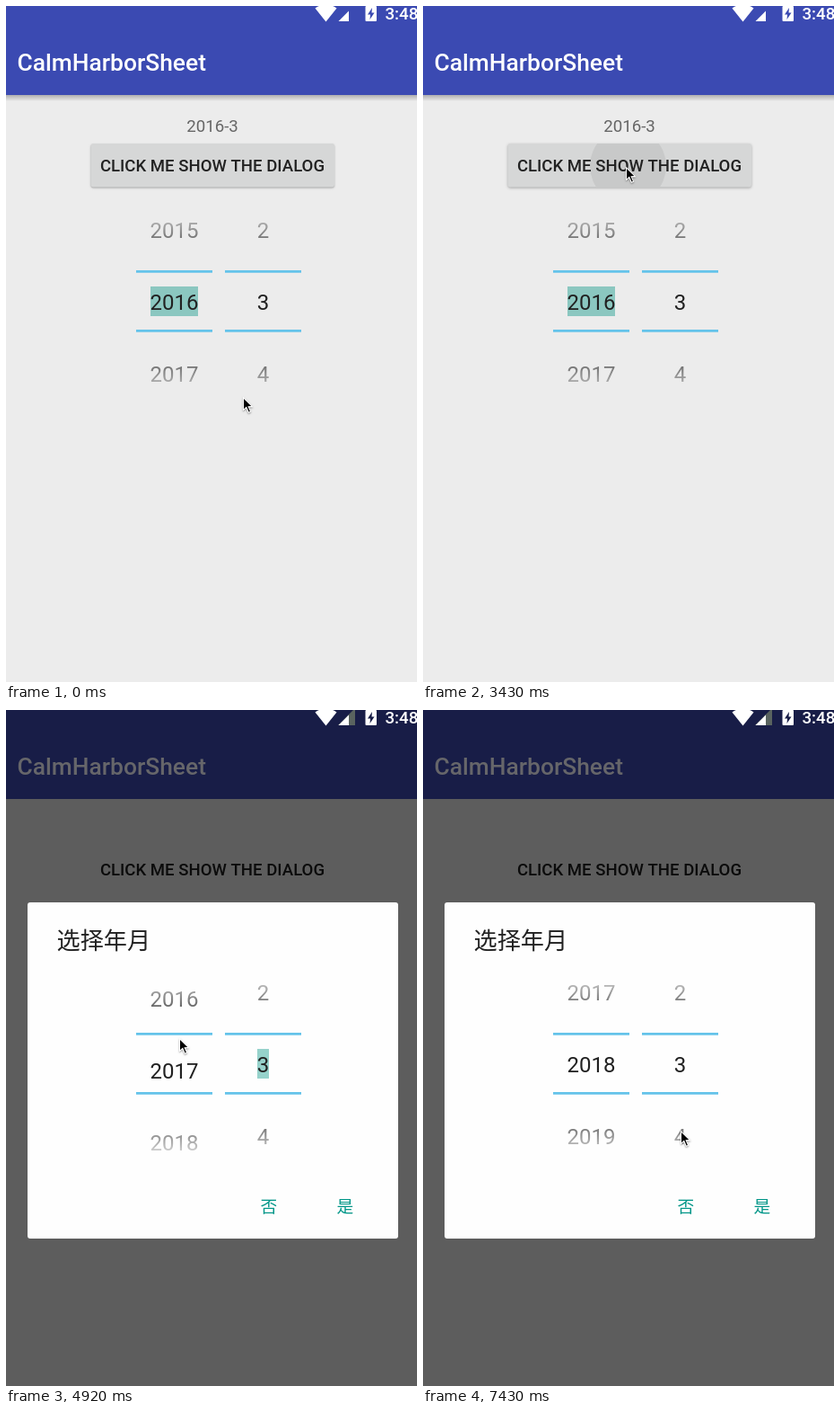
Animation, 458 px wide and 752 px high, one loop 8 s. Source, as an HTML page with a canvas:

```html
<!DOCTYPE html>
<html lang="en">
<head>
<meta charset="utf-8">
<title>Year and month picker</title>
<style>
html, body { margin: 0; width: 100%; height: 100%; overflow: hidden; background: #ececec; }
canvas { display: block; }
</style>
</head>
<body>
<canvas id="stage" width="458" height="752"></canvas>
<script>
const ctx = document.getElementById('stage').getContext('2d');
const LOOP = 8000, TICK = 148.5, ROW = 80;
const INDIGO = '#3b4ab2', NAVY = '#181d47', INK = '#212121', TEAL = '#009688';
const ROBOTO = 'Roboto, sans-serif', CJK = '"Noto Sans CJK SC", "Noto Sans CJK", sans-serif';

const PRESS = 21, DIALOG = 24, BAR_BACK = 25, FOCUS_MONTH = 28, UNFOCUS = 50;

// Key points of the pointer: [tick, x, y]
const pointer = [
  [0, 265, 436], [2, 239, 379], [3, 239, 379], [5, 219, 255], [7, 227, 180],
  [11, 227, 180], [13, 227, 191], [14, 227, 180],
  [24, 227, 180], [27, 194, 447], [33, 194, 366], [35, 194, 448], [39, 194, 379],
  [44, 194, 379], [50, 288, 469]
];
// Year wheel, two drags that each settle on a row: [tick, offset]
const travel = [[27, 0], [33, 73], [35, ROW], [39, 143], [43, 2 * ROW]];

function along(keys, n) {
  const i = keys.findIndex(k => k[0] > n);
  if (i === 0) return keys[0].slice(1);
  if (i < 0) return keys.at(-1).slice(1);
  const [from, ...a] = keys[i - 1], [to, ...b] = keys[i];
  return a.map((v, j) => v + (b[j] - v) * (n - from) / (to - from));
}

function rect(x, y, w, h, color, r = 0) {
  ctx.fillStyle = color;
  ctx.beginPath();
  ctx.roundRect(x, y, w, h, r);
  ctx.fill();
}

function poly(points, color) {
  ctx.fillStyle = color;
  ctx.beginPath();
  points.forEach(([x, y]) => ctx.lineTo(x, y));
  ctx.closePath();
  ctx.fill();
}

function text(str, x, y, font, color, align = 'left') {
  ctx.font = font;
  ctx.textAlign = align;
  ctx.fillStyle = color;
  ctx.fillText(str, x, y);
}

function fadeDown(y, height, stops) {
  const g = ctx.createLinearGradient(0, y, 0, y + height);
  stops.forEach(([at, color]) => g.addColorStop(at, color));
  return g;
}

function wheel(x, mid, value, offset, markWidth) {
  if (markWidth) rect(Math.floor(x - markWidth / 2), mid - 18, markWidth, 33, 'rgba(0,147,130,.41)');
  const clear = 'rgba(33,33,33,0)';
  const ink = fadeDown(mid - 110, 220, [[0, clear], [.3, INK], [.7, INK], [1, clear]]);
  const row = Math.round(offset / ROW);
  for (let i = row - 2; i <= row + 2; i++) {
    text(value + i, x, mid + i * ROW - offset + 8, '24px ' + ROBOTO, ink, 'center');
  }
  for (const dy of [-36, 30]) rect(x - 42.5, mid + dy, 85, 2.7, '#64c3ea');
}

function pickers(mid, offset, focus) {
  wheel(187.5, mid, 2016, offset, focus === 'year' && 53);
  wheel(286.5, mid, 3, 0, focus === 'month' && 13);
}

function statusBar(dim) {
  ctx.fillStyle = '#fff';
  ctx.beginPath();
  ctx.moveTo(356.5, 17.5);
  ctx.lineTo(344.5, 2.5);
  ctx.quadraticCurveTo(356.5, -6, 368.5, 2.5);
  ctx.fill();
  if (dim) poly([[370, 17], [389, 17], [389, -2]], '#59635f');
  poly([[370.5, 17], [382, 17], [382, 5.5]], '#fff');
  rect(400.5, 0, 12.5, 17, '#fff', 1);
  poly([[408, 2], [403, 9.5], [406, 9.5], [405.5, 15], [410.5, 7.5], [407.5, 7.5]], dim ? NAVY : INDIGO);
  text('3:48', 422.5, 15, '500 18.7px ' + ROBOTO, '#fff');
}

function appBar(dim) {
  rect(0, 0, 458, 99, dim ? NAVY : INDIGO);
  text('CalmHarborSheet', 12.5, 71.5, '500 26.4px ' + ROBOTO, dim ? '#66666a' : '#fff');
  if (!dim) rect(0, 99, 458, 7, fadeDown(99, 7, [[0, 'rgba(0,0,0,.26)'], [1, 'rgba(0,0,0,0)']]));
}

function buttonLabel(color) {
  text('CLICK ME SHOW THE DIALOG', 230, 184, '500 18.6px ' + ROBOTO, color, 'center');
}

function button(n) {
  const pressed = n >= PRESS;
  ctx.save();
  ctx.shadowColor = 'rgba(0,0,0,.3)';
  ctx.shadowBlur = pressed ? 3 : 2;
  ctx.shadowOffsetY = 1;
  rect(94.5, 153, 271.5, 48.5, '#d6d7d7', 3);
  ctx.restore();
  if (pressed) {
    const r = 14.5 + 14 * (n - PRESS);
    ctx.save();
    ctx.clip();
    rect(228.5 - r, 178 - r, 2 * r, 2 * r, '#c8c9c9', r);
    ctx.restore();
  }
  buttonLabel(INK);
}

function page(n) {
  rect(0, 0, 458, 752, '#ececec');
  appBar(false);
  statusBar(false);
  text('2016-3', 230, 140, '18.7px ' + ROBOTO, '#666', 'center');
  button(n);
  pickers(330, 0, 'year');
}

function dialog(n) {
  rect(0, 0, 458, 752, '#5d5d5d');
  if (n < BAR_BACK) rect(0, 0, 458, 24, NAVY);
  else appBar(true);
  statusBar(true);
  buttonLabel('#0b0b0b');
  rect(24, 214, 413, 374, '#fefefe', 3);
  text('选择年月', 56.5, 266, '500 26.2px ' + CJK, INK);
  const focus = n < FOCUS_MONTH ? 'year' : n < UNFOCUS ? 'month' : '';
  pickers(395, along(travel, n)[0], focus);
  text('否', 283.5, 558.5, '500 18.7px ' + CJK, TEAL);
  text('是', 368.5, 558.5, '500 18.7px ' + CJK, TEAL);
}

function arrow(x, y) {
  ctx.save();
  ctx.translate(x, y);
  ctx.shadowColor = 'rgba(0,0,0,.4)';
  ctx.shadowBlur = 2;
  ctx.shadowOffsetY = 1;
  poly([[-1, -1.5], [-1, 14.5], [2.6, 11.5], [5, 17], [8.2, 15.6], [5.9, 10.4], [10.5, 10.2]], '#fff');
  ctx.shadowColor = 'transparent';
  poly([[0, 1], [0, 12.2], [3, 9.6], [5.6, 15.5], [6.9, 14.9], [4.4, 9.2], [8.2, 9.1]], '#000');
  ctx.restore();
}

function draw(now) {
  const n = Math.floor(now % LOOP / TICK);
  (n < DIALOG ? page : dialog)(n);
  arrow(...along(pointer, n));
  requestAnimationFrame(draw);
}
requestAnimationFrame(draw);
</script>
</body>
</html>
```
